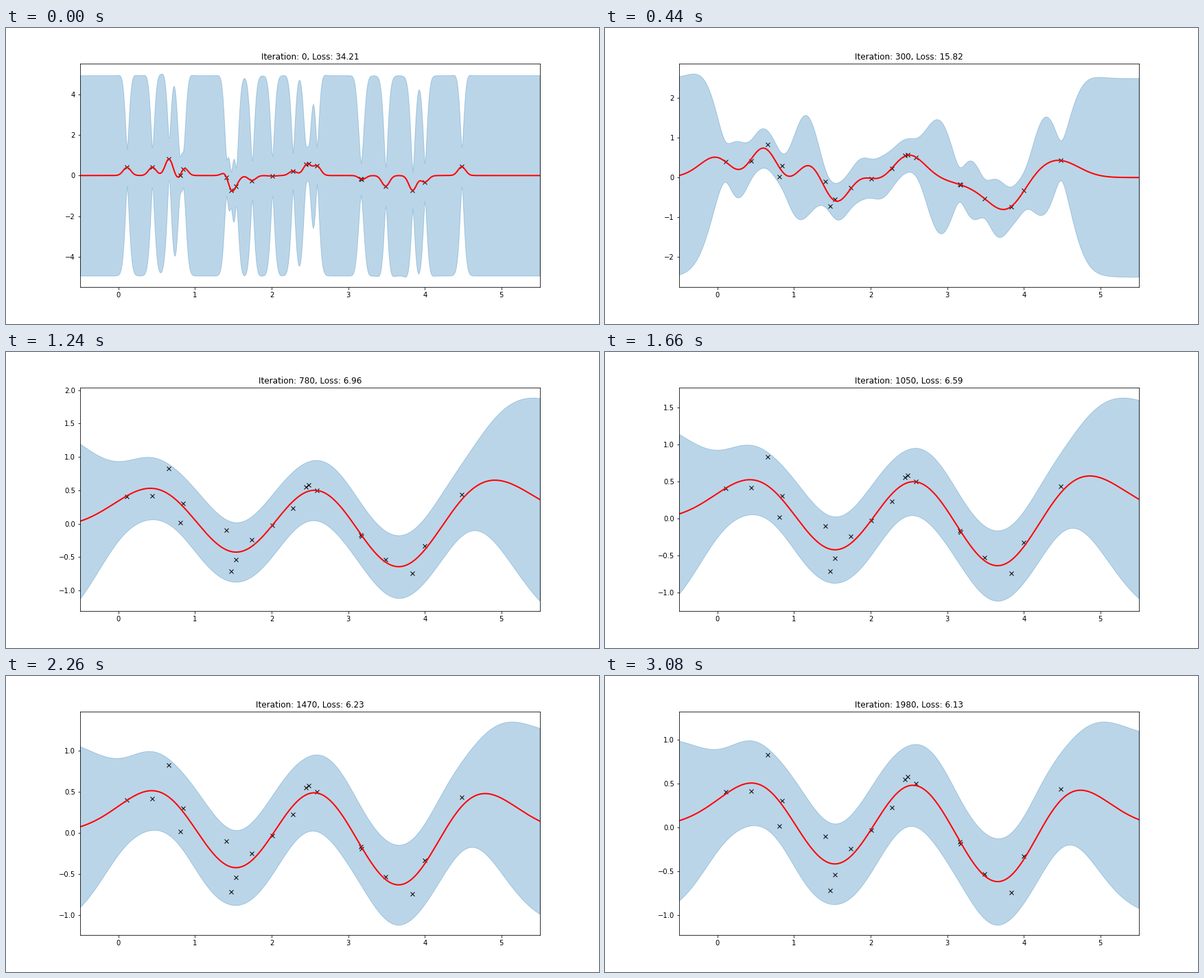
Write a matplotlib script that moves like this. It is 864x432 px and loops after 3.1 s.

```python
import numpy as np
import matplotlib.pyplot as plt
from matplotlib.animation import FuncAnimation

plt.rcParams.update({"font.family": "DejaVu Sans", "font.size": 10})

STRIDE, SHOWN = 30, 67      # iterations between pictures, number of pictures
TICK, TICKS = 20, 155       # ms per animation frame, frames per loop
LR, BETA1, BETA2 = 0.005, 0.9, 0.999

rng = np.random.RandomState(0)


def uniform(n):
    """Single precision uniforms: 24 random bits each."""
    return rng.randint(0, 2 ** 24, size=n, dtype=np.uint32) / 2 ** 24


def box_muller(u):
    first, second = np.split(u, 2)
    radius, angle = np.sqrt(-2 * np.log(1 - first)), 2 * np.pi * second
    return np.concatenate([radius * np.cos(angle), radius * np.sin(angle)])


def normal20():
    """Normals made in blocks of 16; the second block overlaps the first."""
    head = box_muller(uniform(20)[:16])
    return np.concatenate([head[:4], box_muller(uniform(16))])


X = 5 * uniform(20)
Y = 0.5 * np.sin(3 * X) + 0.2 * normal20()
GRID = np.linspace(-0.5, 5.5, 500)


def sq_dist(a, b):
    return (a[:, None] - b[None, :]) ** 2


D_XX, D_XG = sq_dist(X, X), sq_dist(X, GRID)
EYE = np.eye(len(X))


def rbf(d2, amp, length):
    return amp * np.exp(-0.5 * d2 / length ** 2)


def loss_and_grad(theta):
    """Negative log marginal likelihood and its gradient in log parameters."""
    amp, noise, length = np.exp(theta)
    signal = rbf(D_XX, amp, length)
    cov = signal + noise * EYE
    inv = np.linalg.inv(cov)
    alpha = inv @ Y
    loss = 0.5 * (Y @ alpha + np.linalg.slogdet(cov)[1]
                  + len(X) * np.log(2 * np.pi))
    weight = inv - np.outer(alpha, alpha)
    parts = (signal, noise * EYE, signal * D_XX / length ** 2)
    return loss, np.array([0.5 * np.sum(weight * p) for p in parts])


def train():
    """Adam on (amplitude, noise, length scale); returns the shown states."""
    theta = np.log([6.0, 0.1, 0.05])
    m, v = np.zeros(3), np.zeros(3)
    states = []
    for it in range(STRIDE * (SHOWN - 1) + 1):
        loss, grad = loss_and_grad(theta)
        if it % STRIDE == 0:
            states.append((it, loss, theta.copy()))
        m = BETA1 * m + (1 - BETA1) * grad
        v = BETA2 * v + (1 - BETA2) * grad ** 2
        m_hat = m / (1 - BETA1 ** (it + 1))
        v_hat = v / (1 - BETA2 ** (it + 1))
        theta = theta - LR * m_hat / (np.sqrt(v_hat) + 1e-8)
    return states


def predict(theta):
    amp, noise, length = np.exp(theta)
    cov = rbf(D_XX, amp, length) + noise * EYE
    k = rbf(D_XG, amp, length)
    solved = np.linalg.solve(cov, k)
    var = amp + noise - np.sum(k * solved, axis=0)
    return solved.T @ Y, np.sqrt(var)


STATES = train()
fig = plt.figure(figsize=(12, 6), dpi=72)
fig.subplots_adjust(left=0.125, right=0.9, bottom=0.125, top=0.88)
ax = fig.add_subplot()


def picture_at(frame):
    # Pictures last 20, 100 and 20 ms in turn
    cycle, tick = divmod(frame, 7)
    return 3 * cycle + (tick > 0) + (tick > 5)


def draw(frame):
    it, loss, theta = STATES[picture_at(frame)]
    mean, std = predict(theta)
    ax.clear()
    ax.plot(X, Y, "kx")
    ax.fill_between(GRID, mean - 2 * std, mean + 2 * std,
                    color="C0", alpha=0.3, linewidth=1)
    ax.plot(GRID, mean, "r", linewidth=2)
    ax.set_xlim(-0.5, 5.5)
    ax.set_title(f"Iteration: {it}, Loss: {loss:.2f}")
    return []


anim = FuncAnimation(fig, draw, frames=TICKS, interval=TICK,
                     init_func=lambda: [], repeat=True, repeat_delay=0)
plt.show()
```
